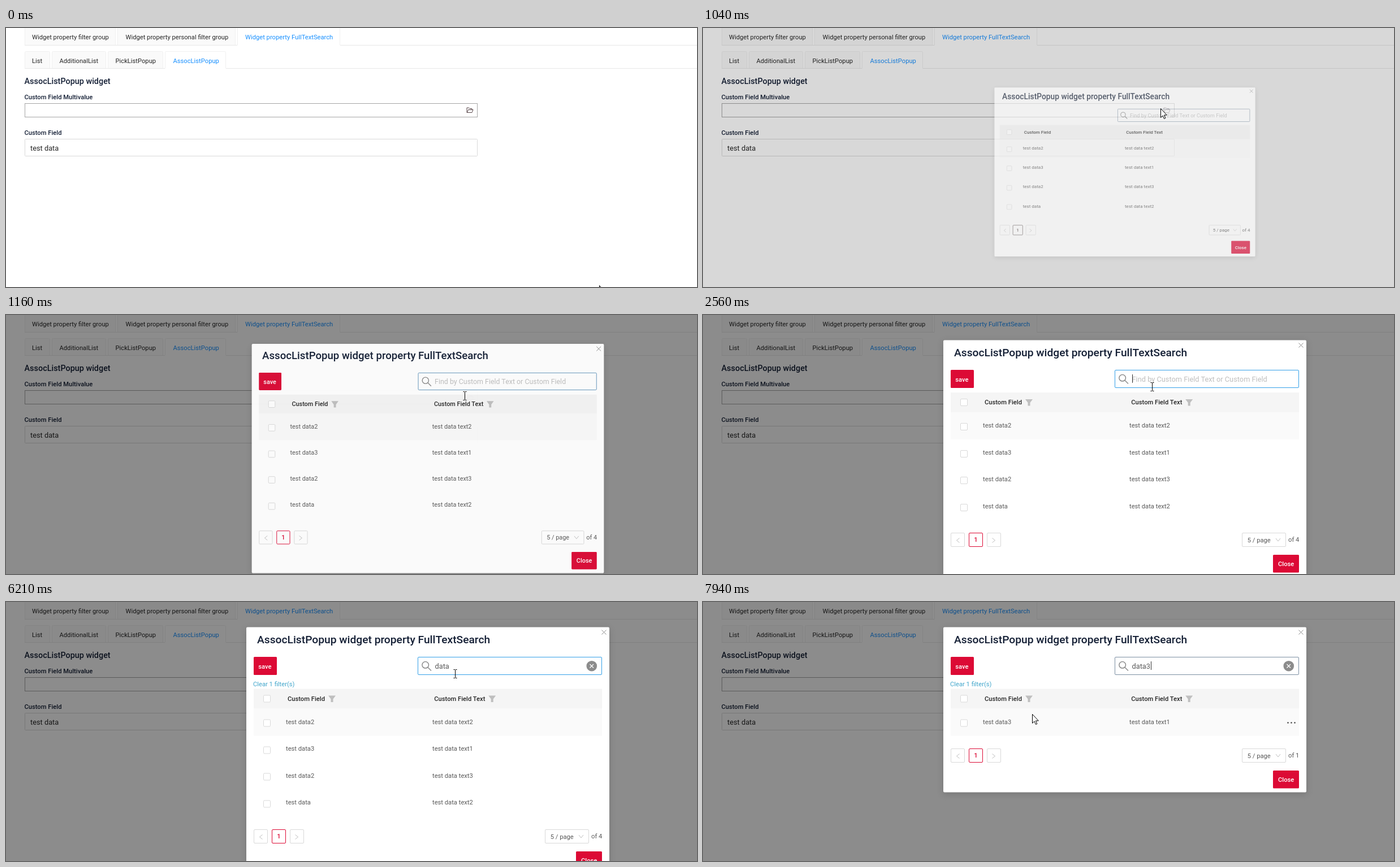
An HTML page for the animation above (8 s loop, 1222x458 px).

```html
<!DOCTYPE html>
<html lang="en">
<head>
<meta charset="utf-8">
<title>Full text search popup</title>
<style>
html, body { margin: 0; width: 100%; height: 100%; overflow: hidden; background: #fff; }
svg { display: block; width: 1222px; height: 458px; }
text { font: 11.2px Roboto, sans-serif; fill: #262626; white-space: pre; }
.medium { font-weight: 500; }
.label { font-weight: 500; fill: #141f35; }
.heading { font-size: 14.4px; }
.title { font-size: 19.2px; }
.field { font-size: 12.8px; }
.blue { fill: #1890ff; }
.white { fill: #fff; }
.cell { fill: #595959; }
.hint { fill: #bfbfbf; }
.tab { fill: #fafafa; stroke: #f0f0f0; }
.box { fill: #fff; stroke: #d9d9d9; }
.red { fill: #dc0a35; }
.line { fill: none; stroke: #8c8c8c; }
.faint { stroke: #bfbfbf; }
#modal { filter: drop-shadow(0 3px 6px rgba(0, 0, 0, .15)); }
</style>
</head>
<body>
<svg viewBox="0 0 1222 458">
  <g id="page"></g>
  <rect id="mask" width="1222" height="458"/>
  <g id="modal">
    <rect id="panel" x="425" y="44.5" width="642" rx="2" fill="#fff"/>
    <path class="line" d="M1053.5 49.5l8 8m0-8l-8 8"/>
    <text class="label title" x="444" y="72.8">AssocListPopup widget property FullTextSearch</text>
    <g id="save">
      <rect class="red" x="438" y="97" width="41" height="32" rx="1.5"/>
      <text class="white medium" x="446.3" y="118">save</text>
    </g>
    <rect id="search" x="728.5" y="97.5" width="325" height="31" rx="1.5" fill="#fff"/>
    <g class="line" stroke-width="1.5"><circle cx="741.7" cy="111.3" r="5.8"/><path d="M746 115.5l6 6"/></g>
    <text id="placeholder" class="field hint" x="758.5" y="117.5">Find by Custom Field Text or Custom Field</text>
    <text id="query" class="field cell" x="758.5" y="117.5"></text>
    <rect id="caret" y="105" width="1" height="15" fill="#333"/>
    <g id="erase">
      <circle cx="1035.8" cy="113.2" r="9.3" fill="#8c8c8c"/>
      <path d="M1032.5 110l6.5 6.5m0-6.5l-6.5 6.5" stroke="#fff" stroke-width="1.3"/>
    </g>
    <text id="clear" x="437" y="149" style="fill:#3fa5cb">Clear 1 filter(s)</text>
    <g id="table"></g>
    <g id="footer">
      <rect class="box" x="438.5" y="385.5" width="24" height="24" rx="1.5"/>
      <path class="line faint" d="M453.5 394.5l-5 4 5 4"/>
      <rect id="current" x="470.5" y="385.5" width="24" height="24" rx="1.5" fill="#fff"/>
      <text id="number" class="medium" x="479.2" y="401.3">1</text>
      <rect class="box" x="502.5" y="385.5" width="24" height="24" rx="1.5"/>
      <path class="line faint" d="M511.5 394.5l5 4-5 4"/>
      <rect class="box" x="953.5" y="385.5" width="77" height="24" rx="1.5"/>
      <text class="cell" x="962.7" y="401.5">5 / page</text>
      <path class="line faint" d="M1013 395l4 5 4-5"/>
      <text id="total" class="cell" x="1035" y="401.3"></text>
      <rect class="red" x="1008" y="424" width="46" height="31.5" rx="1.5"/>
      <text class="white medium" x="1017" y="444">Close</text>
    </g>
  </g>
  <path id="arrow" d="M.5.5V16.3L4 13l2.5 5.5 2.3-1L6.400 12H11.300Z" fill="#fff" stroke="#000"/>
  <path id="beam" d="M-3-7.5h2.200l.8.8.8-.8H3M0-6.700V6.700M-3 7.500h2.200l.8-.8.8.8H3" fill="none" stroke="#000"/>
</svg>
<script>
const LOOP = 8000, ROW = 47.6, RED = '#dc0a35';
const $ = id => document.getElementById(id);
const clamp = v => Math.min(1, Math.max(0, v));
const show = (id, on) => $(id).setAttribute('visibility', on ? 'inherit' : 'hidden');
const move = (id, x, y) => $(id).setAttribute('transform', `translate(${x} ${y})`);
const text = (x, y, string, cls) => `<text class="${cls}" x="${x}" y="${y}">${string}</text>`;
const checkbox = y => `<rect class="box" x="455.5" y="${y - 6}" width="12" height="12" rx="1.5"/>`;
const funnel = x => `<path d="M${x - 6.5} 149h13l-4.500 6v5.500h-4v-5.500z" fill="#bfbfbf"/>`;

// The last tab in a strip is the active one, open at the bottom.
function tabStrip(top, bottom, tabs) {
  const [start, end] = tabs.at(-1);
  return tabs.map(([left, right, textX, string], i) => {
    const active = i === tabs.length - 1;
    return `<path class="tab" ${active ? 'style="fill:#fff"' : ''}
      d="M${left + .5} ${bottom}V${top + 2}q0-2 2-2H${right - 1.5}q2 0 2 2V${bottom}"/>`
      + text(textX, (top + bottom) / 2 + 5.5, string, active ? 'blue' : '');
  }).join('') + `<path d="M33 ${bottom}H${start}M${end + 1} ${bottom}H1222" stroke="#e8e8e8"/>`;
}

$('page').innerHTML =
  tabStrip(-1.5, 30.5, [[33, 193, 46, 'Widget property filter group'],
    [197, 405, 211.5, 'Widget property personal filter group'],
    [409, 590, 423, 'Widget property FullTextSearch']])
  + tabStrip(41.5, 71.5, [[33, 77, 46, 'List'], [81, 176, 94.5, 'AdditionalList'],
    [180, 277, 193.5, 'PickListPopup'], [281, 388, 295.5, 'AssocListPopup']])
  + text(32.5, 98.5, 'AssocListPopup widget', 'label heading')
  + text(32.5, 126, 'Custom Field Multivalue', 'label')
  + '<rect x="33.5" y="133.5" width="800" height="24" fill="#fff" stroke="#a6a6a6"/>'
  + '<path d="M816.500 149.500h-1.500v-8.500h3.500l1.500 1.500h4v2M815.500 149.500l2-5h8.500l-2 5z" fill="none" stroke="#59464a"/>'
  + text(32.5, 188.5, 'Custom Field', 'label')
  + '<rect class="box" x="33.5" y="196.5" width="800" height="30" rx="1"/>'
  + text(43, 216.5, 'test data', 'field');

const records = [['test data2', 'test data text2'], ['test data3', 'test data text1'],
  ['test data2', 'test data text3'], ['test data', 'test data text2']];

function drawTable(rows, loading) {
  const shift = loading ? -1.5 : 0, column = loading ? 746 : 754;
  return '<rect x="438" y="137" width="616" height="35" fill="#f5f5f5"/>'
    + `<rect x="438" y="172" width="616" height="${48 + shift}" fill="${loading ? '#fcfcfc' : '#fafafa'}"/>`
    + checkbox(154.5) + text(498, 158, 'Custom Field', 'medium')
    + text(column + 3.3, 158, 'Custom Field Text', 'medium')
    + (loading ? '' : funnel(576.5) + funnel(859.7))
    + rows.map(([name, value], i) => {
      const y = 195 + shift + i * ROW;
      return checkbox(Math.round(y + 2) + .5) + text(495, y + 4, name, 'cell') + text(column, y + 4, value, 'cell');
    }).join('')
    + '<g id="dots" fill="#444"><circle cx="1034.500" cy="197" r="1.300"/><circle cx="1040.500" cy="197" r="1.300"/><circle cx="1046.500" cy="197" r="1.300"/></g>';
}

// Pointer path: time, x, y
const path = [[30, 1049, 455], [210, 860, 310], [390, 646, 195], [510, 695, 128], [680, 809, 142],
  [1080, 809, 142], [1160, 811, 143], [1500, 811, 143], [1760, 806, 121], [2150, 801, 108], [2500, 801, 108],
  [2560, 794, 126.5], [6450, 794, 126.5], [6610, 798, 139], [6790, 798, 139], [6900, 806, 144],
  [7070, 806, 144], [7400, 800, 235], [7610, 797, 241], [7930, 582, 198]];

function pointer(t) {
  const next = path.findIndex(p => p[0] > t);
  if (next < 1) return path.at(next).slice(1);
  const [t0, x0, y0] = path[next - 1], [t1, x1, y1] = path[next];
  const k = (t - t0) / (t1 - t0);
  return [x0 + (x1 - x0) * k, y0 + (y1 - y0) * k];
}

// cubic-bezier(.08, .82, .17, 1)
function easeOutCirc(x) {
  const curve = (u, a, b) => 3 * u * (1 - u) ** 2 * a + 3 * u * u * (1 - u) * b + u ** 3;
  let low = 0, high = 1;
  for (let i = 0; i < 24; i++) {
    const mid = (low + high) / 2;
    if (curve(mid, .08, .17) < x) low = mid; else high = mid;
  }
  return curve(low, .82, 1);
}

const mix = (from, to, k) => `rgb(${from.map((v, i) => Math.round(v + (to[i] - v) * k))})`;
const within = (t, spans) => spans.some(([from, to]) => t >= from && t < to);
const keyTimes = [4130, 4230, 4540, 4640, 6370];
let tableState;

function render(t) {
  $('mask').setAttribute('opacity', .45 * clamp((t - 980) / 180));

  const zoom = easeOutCirc(clamp((t - 1005) / 300)), scale = .2 + .8 * zoom;
  show('modal', t >= 1005);
  $('modal').setAttribute('opacity', zoom);
  $('modal').setAttribute('transform', `translate(746 260) scale(${scale}) translate(-746 -260)`);

  const loading = within(t, [[0, 1090], [5180, 5260], [6910, 7070]]);
  const filtered = t >= 5180, single = t >= 7010;
  const rows = single ? [records[1]] : records;
  const state = `${loading} ${single}`;
  if (state !== tableState) {
    $('table').innerHTML = drawTable(rows, loading);
    tableState = state;
  }
  const top = filtered ? 16.5 : 0;
  const rise = top - (4 - rows.length) * ROW - (loading ? 2 : 0);
  move('table', 0, top);
  move('footer', 0, Math.round(rise));
  $('panel').setAttribute('height', 418 + Math.round(rise));
  $('total').textContent = t >= 7070 ? 'of 1' : 'of 4';
  const accent = t < 1090 ? '#594d4d' : RED;
  $('current').setAttribute('stroke', accent);
  $('number').style.fill = accent;
  show('save', !loading);
  show('clear', filtered);
  show('dots', t >= 7700);

  const glow = clamp((t - 1090) / 200) * (1 - clamp((t - 6500) / 110));
  $('search').setAttribute('stroke', mix([124, 143, 163], [52, 160, 232], glow));
  const typed = 'data3'.slice(0, keyTimes.filter(k => t >= k).length);
  if ($('query').textContent !== typed) $('query').textContent = typed;
  show('placeholder', !typed);
  show('erase', typed);
  show('caret', within(t, [[2500, 3010], [3520, 4030], [4130, 5180], [5700, 6210], [6370, 6910], [7420, LOOP]]));
  $('caret').setAttribute('x', 759 + Math.round(typed ? $('query').getComputedTextLength() : 0));

  const overText = t >= 1130 && t < 6820, [x, y] = pointer(t).map(Math.round);
  show('arrow', !overText);
  show('beam', overText);
  move('arrow', x, y);
  move('beam', x + .5, y);
}

function frame() {
  render(performance.now() % LOOP);
  requestAnimationFrame(frame);
}
frame();
</script>
</body>
</html>
```
